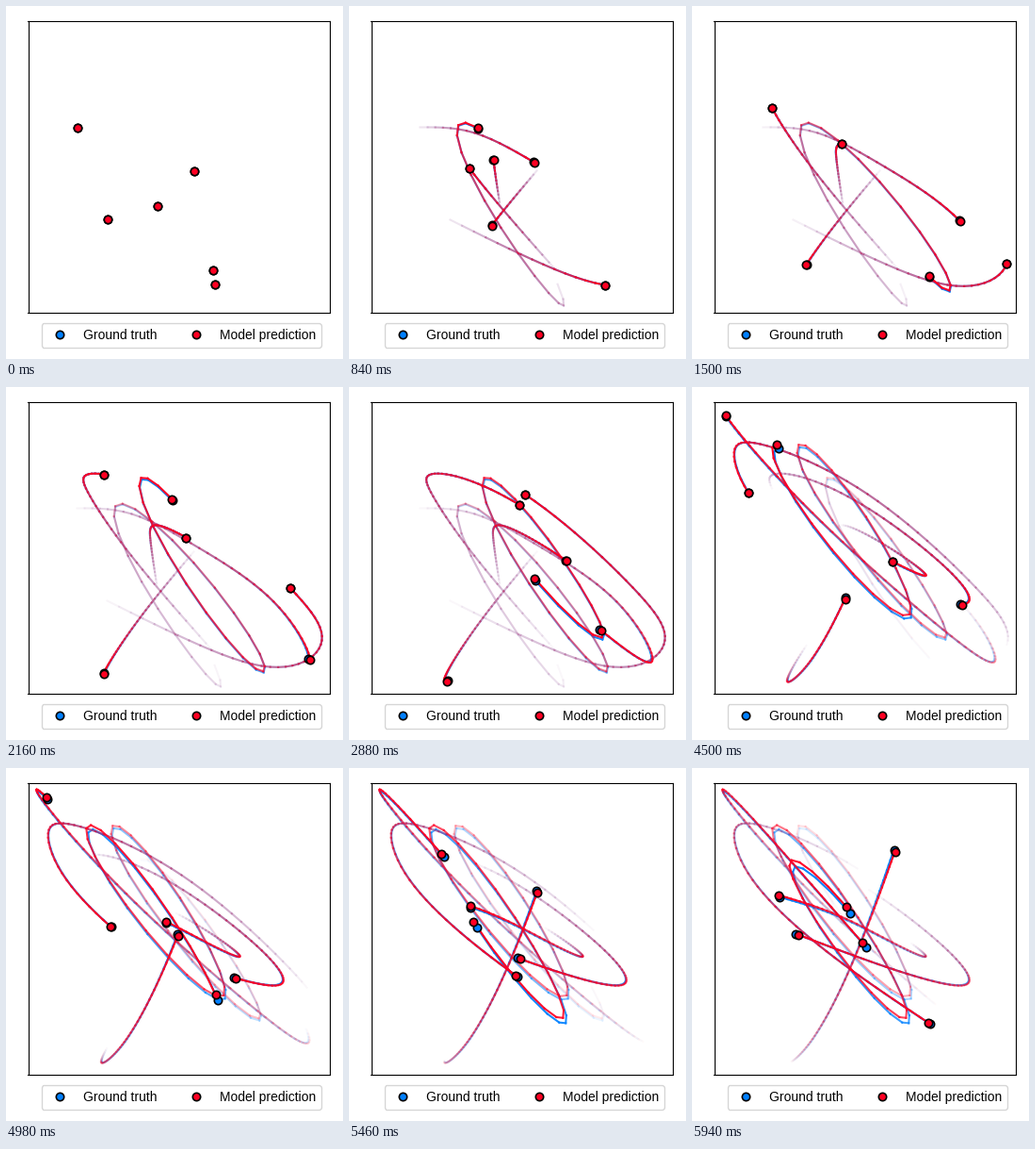
Animation of 358x374 px, one loop 6000 ms. Source, as a matplotlib script:

```python
import numpy as np
import matplotlib.pyplot as plt
from matplotlib.animation import FuncAnimation
from matplotlib.collections import LineCollection
from matplotlib.colors import to_rgb
from matplotlib.lines import Line2D

W, H, DPI = 358, 374, 100
FRAMES, INTERVAL, TRAIL = 100, 60, 50
BLUE, RED = "#0080ff", "#ff0022"
LEFT, RIGHT, TOP, BOTTOM = 23, 343, 15, 324
TIMES = np.arange(FRAMES, dtype=float)

plt.rcParams["font.family"] = "Liberation Sans"


def spline(t, v):
    """Natural cubic spline through (t, v), sampled once per frame."""
    h = np.diff(t)
    n = len(t)
    m = np.eye(n)
    rhs = np.zeros(n)
    for i in range(1, n - 1):
        m[i, i - 1:i + 2] = h[i - 1], 2 * (h[i - 1] + h[i]), h[i]
        rhs[i] = 6 * ((v[i + 1] - v[i]) / h[i] - (v[i] - v[i - 1]) / h[i - 1])
    c = np.linalg.solve(m, rhs)
    k = np.clip(np.searchsorted(t, TIMES, side="right") - 1, 0, n - 2)
    a, b, s = t[k + 1] - TIMES, TIMES - t[k], h[k]
    return ((c[k] * a**3 + c[k + 1] * b**3) / (6 * s)
            + (v[k] / s - c[k] * s / 6) * a
            + (v[k + 1] / s - c[k + 1] * s / 6) * b)


def swing(turns):
    """Half cosine waves between the (time, value) turning points."""
    t, v = np.array(turns, float).T
    k = np.searchsorted(t, TIMES, side="right") - 1
    u = (TIMES - t[k]) / (t[k + 1] - t[k])
    return v[k] + (v[k + 1] - v[k]) * (1 - np.cos(np.pi * u)) / 2


def glide(*keys):
    t, x, y = np.array(keys, float).T
    return np.column_stack([spline(t, x), spline(t, y)])


def drift(middle, end):
    """How far the truth has moved away from the prediction."""
    return np.column_stack([np.interp(TIMES, [0, 60, 99], [0, m, e])
                            for m, e in zip(middle, end)])


wide = glide((0, 75, 128), (7, 133, 134), (14, 196, 165), (25, 284, 227),
             (36, 322, 288), (48, 267, 257), (60, 138, 143), (75, 35, 29),
             (83, 42, 30), (99, 180, 184))
outer = glide((0, 107, 226), (7, 194, 268), (14, 271, 295), (26, 335, 268),
              (36, 301, 212), (48, 186, 113), (60, 72, 60), (67, 45, 65),
              (75, 59, 111), (83, 110, 167), (99, 250, 269))
inner = glide((0, 160, 211), (14, 153, 162), (24, 157, 146), (36, 191, 159),
              (60, 248, 199), (75, 212, 184), (83, 169, 162), (99, 91, 134))
slow = glide((0, 199, 174), (14, 151, 232), (36, 103, 303), (46, 102, 312),
             (60, 125, 290), (75, 162, 224), (83, 182, 177), (99, 215, 88))
hook = glide((0, 219, 279), (14, 127, 171), (24, 86.5, 111), (30, 83, 94),
             (36, 103, 92), (48, 180, 124), (60, 266, 188), (69, 294, 222),
             (75, 286, 230), (83, 243, 222), (99, 112, 176))
fast = np.column_stack([
    swing([(-8.5, 114), (1.6, 228), (11.3, 114), (22.3, 274.5), (32.1, 141),
           (43.3, 270), (53.2, 111), (63.4, 232), (73.7, 84.5), (84.4, 228),
           (94.1, 103), (104.2, 230)]),
    swing([(-7.7, 123), (2.2, 317), (12.8, 123), (23.2, 301), (33.4, 95),
           (44.2, 265), (54.4, 60), (64.6, 242), (74.9, 60), (85.4, 265),
           (95.2, 97), (105.6, 265)])])

guesses = np.array([wide, outer, inner, slow, hook, fast])
truths = guesses + np.array([
    drift((-2, -1), (4, 5)), drift((0, 0), (2, 1.5)),
    drift((-0.5, 0), (1, 2)), drift((1, -0.5), (-1, -2)),
    drift((0, 0), (-3, -1)), drift((1, 3), (4, 7))])

fig = plt.figure(figsize=(W / DPI, H / DPI), dpi=DPI, facecolor="white")
ax = fig.add_axes([(LEFT + 0.5) / W, 1 - (BOTTOM + 0.5) / H,
                   (RIGHT - LEFT) / W, (BOTTOM - TOP) / H])
ax.set(xlim=(LEFT, RIGHT), ylim=(BOTTOM, TOP), xticks=[], yticks=[])

DOT = dict(marker="o", ls="", ms=6, mec="black", mew=1.2)


def add_layer(color, z):
    trail = LineCollection([], linewidths=1.5, capstyle="projecting", zorder=z)
    ax.add_collection(trail, autolim=False)
    dots, = ax.plot([], [], color=color, zorder=z + 2, **DOT)
    return trail, dots, to_rgb(color)


layers = [(truths, *add_layer(BLUE, 2)), (guesses, *add_layer(RED, 3))]

fig.legend(
    handles=[Line2D([], [], color=BLUE, label="Ground truth", **DOT),
             Line2D([], [], color=RED, label="Model prediction", **DOT)],
    ncol=2, fontsize=10, loc="lower left", borderaxespad=0,
    bbox_to_anchor=(37.5 / W, 12.5 / H))


def draw(i):
    start = max(0, i - TRAIL)
    count = i - start
    fade = (np.arange(count) + 1) / max(count, 1)
    for paths, trail, dots, rgb in layers:
        part = paths[:, start:i + 1]
        segments = np.stack([part[:, :-1], part[:, 1:]], axis=2)
        trail.set_segments(segments.reshape(-1, 2, 2))
        trail.set_color([(*rgb, a) for a in np.tile(fade, len(paths))])
        dots.set_data(paths[:, i, 0], paths[:, i, 1])
    return [artist for layer in layers for artist in layer[1:3]]


anim = FuncAnimation(fig, draw, frames=FRAMES, interval=INTERVAL, repeat=True)
plt.show()
```
